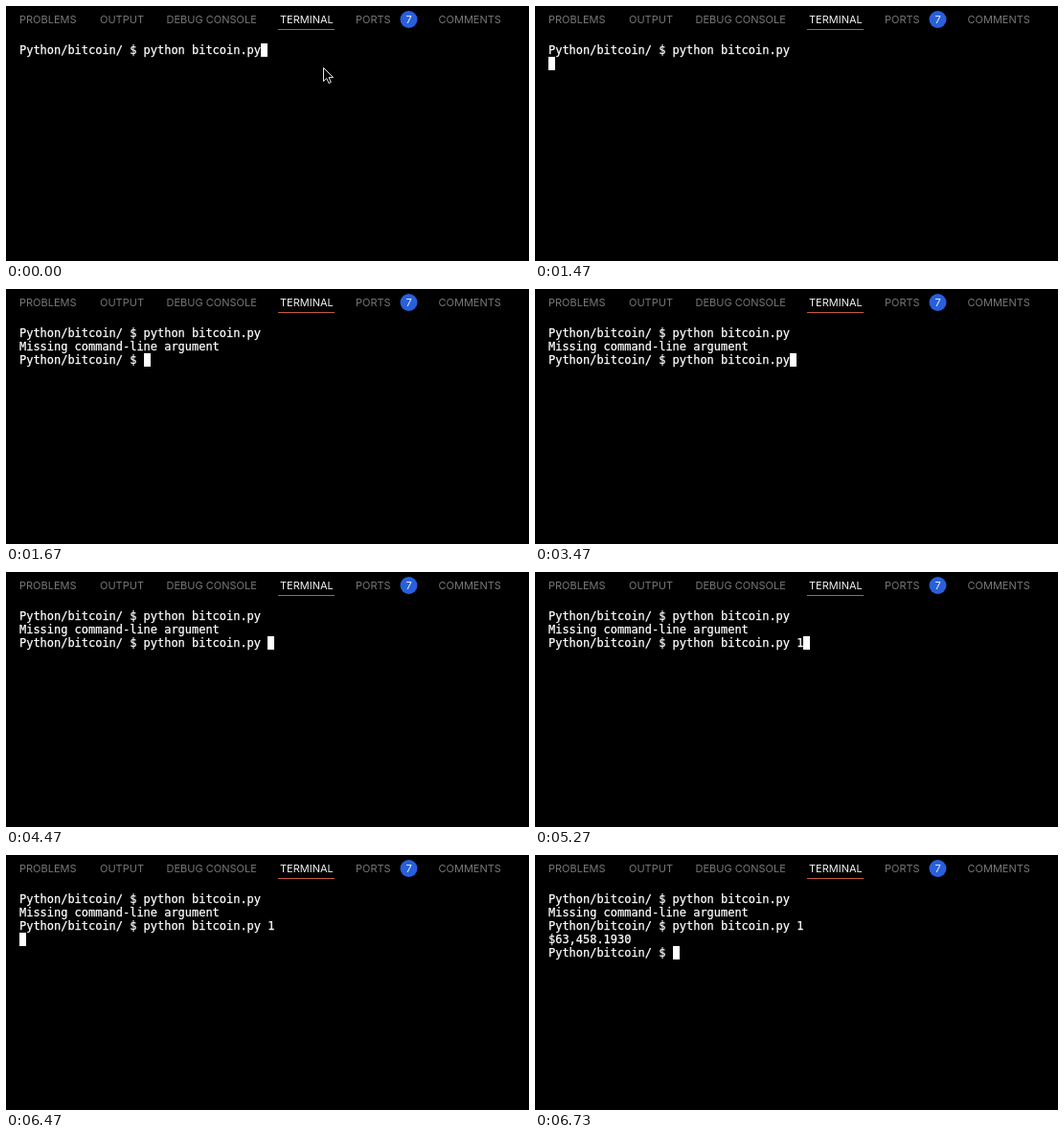
Recreate the animation shown at these times as an HTML page. Size 546 by 266 pixels, loop 8 s.

```html
<!DOCTYPE html>
<html lang="en">
<head>
<meta charset="utf-8">
<title>Terminal</title>
<style>
html, body { margin: 0; width: 100%; height: 100%; overflow: hidden; background: #000; }
svg { display: block; }
#tabs { font: 11px Inter, sans-serif; fill: #77777b; }
#tabs .on { fill: #f2f2f2; }
#lines {
  font: 12px "DejaVu Sans Mono", monospace; letter-spacing: -.024px;
  fill: #fff; stroke: #fff; stroke-width: .25px; white-space: pre;
}
</style>
</head>
<body>
<svg width="546" height="266" viewBox="0 0 546 266">
  <g id="tabs">
    <text x="14" y="18">PROBLEMS</text>
    <text x="98" y="18">OUTPUT</text>
    <text x="167.5" y="18">DEBUG CONSOLE</text>
    <text x="286" y="18" class="on">TERMINAL</text>
    <text x="365" y="18">PORTS</text>
    <text x="451.5" y="18">COMMENTS</text>
    <rect x="284" y="24" width="59" height="1" fill="#c75a3c"/>
    <circle cx="420.5" cy="14" r="9" fill="#2860dc"/>
    <text x="420.5" y="18" text-anchor="middle" class="on">7</text>
  </g>
  <g id="lines"></g>
  <rect id="caret" width="7" height="14" fill="#fff"/>
  <path id="mouse" d="M331.5 64.5V78.5L334.8 75.5L337 80.5L339.3 79.5L337.1 74.6H341.5Z"
    fill="#000" stroke="#e8e8e8"/>
</svg>
<script>
const LOOP = 8000, LEFT = 14, TOP = 39, CHAR = 7.2, ROW = 14;
const prompt = "Python/bitcoin/ $ ";
const command = prompt + "python bitcoin.py";
const failed = command + "\nMissing command-line argument\n";

// Each step: start time in ms, then everything printed up to the caret.
const steps = [
  [0, command],
  [1470, command + "\n"],
  [1670, failed + prompt],
  [3470, failed + command],
  [4470, failed + command + " "],
  [5200, failed + command + " 1"],
  [6470, failed + command + " 1\n"],
  [6730, failed + command + " 1\n$63,458.1930\n" + prompt]
];

const get = id => document.getElementById(id);
const lines = get("lines"), caret = get("caret"), mouse = get("mouse");
let shown;

function show(text) {
  const rows = text.split("\n"), last = rows.length - 1;
  lines.replaceChildren(...rows.map((row, i) => {
    const el = document.createElementNS("http://www.w3.org/2000/svg", "text");
    el.setAttribute("x", LEFT);
    el.setAttribute("y", TOP + 11 + i * ROW);
    el.textContent = row;
    return el;
  }));
  caret.setAttribute("x", Math.round(LEFT + rows[last].length * CHAR));
  caret.setAttribute("y", TOP + last * ROW);
}

function draw() {
  const t = performance.now() % LOOP;
  const step = steps.findLast(([start]) => t >= start);
  if (step !== shown) {
    shown = step;
    show(step[1]);
    mouse.style.display = step === steps[0] ? "" : "none";
  }
  requestAnimationFrame(draw);
}
draw();
</script>
</body>
</html>
```
